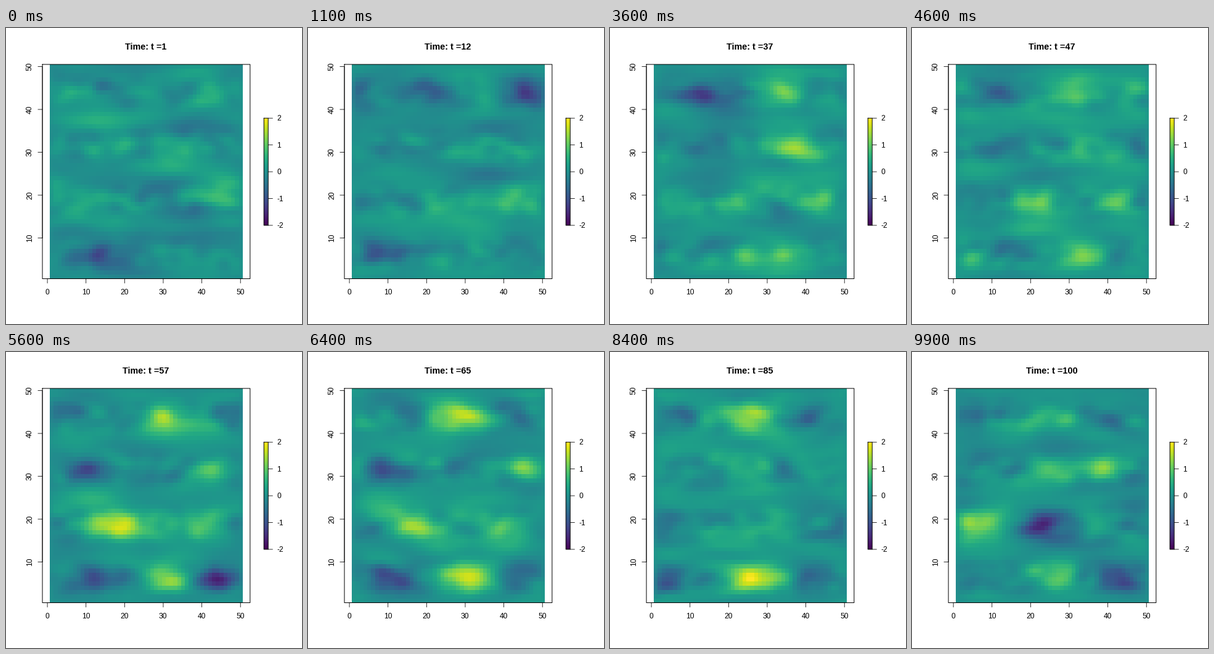
Animation of 480x480 px, one loop 10 s. Source, as a matplotlib script:

```python
import numpy as np
import matplotlib.pyplot as plt
from matplotlib.animation import FuncAnimation

N, FRAMES, DPI = 50, 100, 80
PX = 72 / DPI                  # one pixel in points
FLOW = .007                    # leftward speed per cell from the right wall
ROW0, ROW_GAP = 6.2, 12.6      # lively rows of the field
plt.rcParams["font.family"] = "Liberation Sans"

# Main eddies: row, peak time, lifetime, x at the peak, strength
EDDIES = [
    (3, 66, 45, 28, 1.45), (3, 30, 18, 15, -1.4), (3, 20, 13, 45, -1.2),
    (3, 80, 18, 41, -1), (3, 84, 14, 8, -1),
    (2, 37, 12, 38, 1.1), (2, 56, 13, 11, -1), (2, 58, 13, 42, .8),
    (2, 98, 16, 26, .95), (2, 100, 11, 38, 1.1),
    (1, 45, 50, 41, 1.1), (1, 57, 14, 18, 1.5), (1, 100, 14, 6, 1.5),
    (1, 100, 10, 23, -1.3), (1, 22, 12, 27, 1),
    (0, 76, 40, 29, 1.4), (0, 8, 20, 10, -1.1), (0, 72, 28, 8, -1.3),
    (0, 57, 10, 44, -1.1), (0, 100, 13, 44, -1.3),
]

gx, gy = np.meshgrid(np.arange(1, N + 1), np.arange(1, N + 1))
edge = np.minimum.reduce([gx, gy, N + 1 - gx, N + 1 - gy])
taper = 1 - np.exp(-(edge - .2) / 1.2)
band = .5 + .5 * np.cos(2 * np.pi * (gy - ROW0) / ROW_GAP)


def sheets(seed, sx, sy, count=14):
    """Smooth random fields with the given blur widths."""
    f = np.fft.fftfreq(N)
    blur = np.exp(-2 * np.pi**2 * ((sx * f[None, :])**2 + (sy * f[:, None])**2))
    white = np.random.default_rng(seed).normal(size=(count, N, N))
    smooth = np.fft.ifft2(np.fft.fft2(white) * blur).real
    return smooth / smooth.std()


noise = .2 * band * sheets(3, 1.7, 1.2) + .17 * sheets(7, 5, 1.6)


def eddy(t, row, peak, life, x, a):
    dt = t - peak
    cx = N - (N - x) * np.exp(FLOW * dt)
    dy = gy - ROW0 - ROW_GAP * row
    rx = (2.6 + 2.6 * abs(a)) * (1 + .06 * abs(dy))
    ry = 1.7 + 1.1 * abs(a)
    d = ((gx - cx) / rx)**2 + (dy / ry)**2
    return a * np.exp(-d**1.1 - (dt / life)**2)


def field(t):
    n, u = divmod(t / 8, 1)
    n, u = int(n), u * np.pi / 2
    stir = np.cos(u) * noise[n] + np.sin(u) * noise[n + 1]
    return taper * (.08 + stir + sum(eddy(t, *e) for e in EDDIES))


fig = plt.figure(figsize=(480 / DPI, 480 / DPI), dpi=DPI, facecolor="white")
ax = fig.add_axes([0, 0, 1, 1])
ax.axis("off")


def line(xs, ys, width=.8):
    ax.plot(xs, ys, color="black", lw=width * PX, snap=False,
            solid_capstyle="round", zorder=3)


def box(x0, y0, x1, y1):
    line([x0, x1, x1, x0, x0], [y0, y0, y1, y1, y0], 1)


def label(x, y, s, size=12, **kw):
    kw.setdefault("ha", "center")
    return ax.text(x, y, s, size=size * PX, va="baseline", **kw)


def to_x(v):
    return 67.1 + 6.262 * v


def to_y(v):
    return 406.56 - 6.95 * (v - .5)


def paint(values, extent):
    return ax.imshow(values, cmap="viridis", vmin=-2, vmax=2, origin="lower",
                     extent=extent, aspect="auto", interpolation="nearest")


LEFT, TOP, RIGHT, BOTTOM = 59.04, 59.04, 395.8, 406.56
image = paint(field(1), (70.6, 383.3, BOTTOM, TOP))
box(LEFT, TOP, RIGHT, BOTTOM)
line([to_x(0), to_x(50)], [BOTTOM, BOTTOM])
line([LEFT, LEFT], [to_y(10), to_y(50)])
for v in range(0, 51, 10):
    line([to_x(v)] * 2, [BOTTOM, BOTTOM + 7.2])
    label(to_x(v) - .3, 432, str(v))
for v in range(10, 51, 10):
    line([LEFT, LEFT - 7.2], [to_y(v)] * 2)
    label(42, to_y(v), str(v), rotation=90, rotation_mode="anchor")

paint(np.linspace(-2, 2, 256)[:, None], (418.2, 425.2, 320, 146.2))
box(418.2, 146.2, 425.2, 320)
for v in range(-2, 3):
    y = 233.1 - 43.45 * v
    line([425.2, 432.4], [y, y])
    label(439, y + 4, str(v), ha="left")

title = label(226.7, 35, "", size=14.4, weight="bold")
ax.set_xlim(0, 480)
ax.set_ylim(480, 0)


def update(i):
    t = i + 1
    image.set_data(field(t))
    title.set_text(f"Time: t ={t}")
    return image, title


anim = FuncAnimation(fig, update, frames=FRAMES, interval=100, repeat=True)
plt.show()
```
